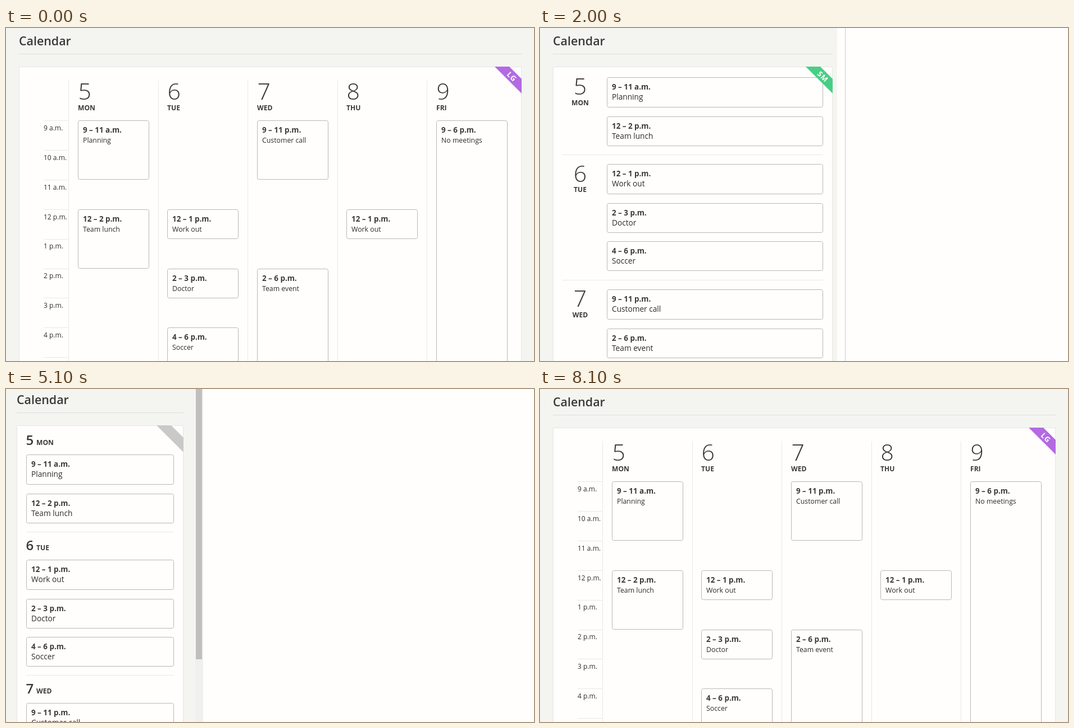
Recreate the animation shown at these times as an HTML page. Size 940x595 px, loop 8400 ms.

```html
<!DOCTYPE html>
<html lang="en">
<head>
<meta charset="utf-8">
<title>Calendar</title>
<style>
html, body { margin: 0; width: 100%; height: 100%; overflow: hidden; background: #fffefd; }
svg { display: block; font-family: "Open Sans", "Noto Sans", sans-serif; fill: #3b3938; }
.title { font-size: 21.4px; font-weight: 600; }
.num { font-size: 41px; font-weight: 300; }
.inline { font-size: 24px; font-weight: 600; }
.day { font-size: 12.1px; font-weight: 700; }
.hour { font-size: 12px; fill: #2e2c2b; }
.time { font-size: 13.4px; font-weight: 700; }
.what { font-size: 13.7px; fill: #2e2c2b; }
.small { font-size: 12.3px; }
.mid { text-anchor: middle; }
.tag { font-size: 13px; font-weight: 700; letter-spacing: 1px; fill: #fff; text-anchor: middle; }
.box { fill: #fffefd; stroke: #b9b8b6; }
.panel { fill: #fffefd; stroke: #e6e6e3; }
</style>
</head>
<body>
<svg id="stage" width="940" height="595" viewBox="0 0 940 595"></svg>
<script>
// [start hour, length, time label, title]
const days = [
  ['MON', [9, 2, '9 – 11 a.m.', 'Planning'], [12, 2, '12 – 2 p.m.', 'Team lunch']],
  ['TUE', [12, 1, '12 – 1 p.m.', 'Work out'], [14, 1, '2 – 3 p.m.', 'Doctor'], [16, 2, '4 – 6 p.m.', 'Soccer']],
  ['WED', [9, 2, '9 – 11 p.m.', 'Customer call'], [14, 4, '2 – 6 p.m.', 'Team event']],
  ['THU', [12, 1, '12 – 1 p.m.', 'Work out']],
  ['FRI', [9, 9, '9 – 6 p.m.', 'No meetings']]
];
// [minimum panel width, label, ribbon colour]
const sizes = [[768, 'LG', '#b36ae2'], [576, 'MD', '#3fbac4'], [384, 'SM', '#4acd86'], [0, '', '#c9c9c8']];
// [step, right edge of the pane, layout width]
const drag = [
  [2, 947, 941], [6, 897, 884], [11, 773, 760], [13, 720, 710], [15, 674, 664],
  [20, 544, 544], [24, 425, 424], [29, 367, 366], [32, 352, 350], [33, 345, 343]
];
const STEP = 100, LOOP = 8400, FIRST = 2, LAST = 33;

const snap = v => Math.round(v - .5) + .5;
const text = (cls, x, y, s) => `<text class="${cls}" x="${x}" y="${y}">${s}</text>`;
const fill = (x, y, w, h, color) => `<rect x="${x}" y="${y}" width="${w}" height="${h}" fill="${color}"/>`;
const hline = (x1, x2, y, color = '#e8e8e6') => fill(x1, Math.round(y - .5), x2 - x1, 1, color);

function eventBox(x, y, w, h, [, , time, what], small = '') {
  y = snap(y);
  return `<rect class="box" x="${x}" y="${y}" width="${w}" height="${h}" rx="3"/>` +
    text('time', x + 8.5, y + 21.5, time) + text('what ' + small, x + 8.5, y + 39.5, what);
}

function weekGrid(right) {
  const w = right - 23, col = w * .1782, left = 23 + w * .099, hour = 52.9;
  let out = '';
  for (let h = 9; h < 18; h++) {
    const y = 165.5 + (h - 9) * hour;
    out += hline(left - 44.6, left, y) +
      text('hour', left - 44.6, y + 17.3, `${(h + 11) % 12 + 1} ${h < 12 ? 'a' : 'p'}.m.`);
  }
  days.forEach(([name, ...events], i) => {
    const x = left + i * col, bx = snap(x + 16.9);
    out += fill(Math.round(x - .5), 93, 1, 502, '#e8e8e6') +
      text('num', bx, 128, 5 + i) + text('day', bx - .5, 147, name);
    for (const e of events)
      out += eventBox(bx, 165.5 + (e[0] - 9) * hour, Math.round(col - 33), Math.round(e[1] * hour - .8), e, 'small');
  });
  return out;
}

function dayList(pad, right, stacked) {
  const x = stacked ? pad + 17.5 : 119.5, w = right - 17.5 - x;
  let y = pad + 48.4, out = '';
  days.forEach(([name, ...events], i) => {
    if (i) out += hline(pad + 17, right - 17, y);
    if (stacked) {
      const base = Math.round(y + 32.5);
      out += text('inline', pad + 16.5, base, 5 + i) + text('day', pad + 35, base, name);
      y += 49.8;
    } else {
      y += 17.05;
      out += text('num mid', 71.5, y + 31, 5 + i) + text('day mid', 71.5, y + 49.5, name);
    }
    // the first box of a day is slightly taller
    events.forEach((e, n) => {
      out += eventBox(x, y, w, n ? 52 : 53, e);
      y += n ? 68.2 : 70;
    });
  });
  return out;
}

function ribbon(r, top, label, color) {
  const x = r - 17.5, y = top + 17.5;
  return `<path fill="${color}" d="M${r - 48} ${top}h26L${r} ${top + 22}v26z"/>` +
    `<g transform="translate(${x} ${y}) rotate(45)">${text('tag', .5, 5, label)}</g>`;
}

function paneAt(k) {
  const i = Math.max(1, drag.findIndex(d => d[0] >= k));
  const a = drag[i - 1], b = drag[i], f = (k - a[0]) / (b[0] - a[0]);
  return [1, 2].map(n => Math.round(a[n] + (b[n] - a[n]) * f));
}

function draw(k) {
  const [edge, width] = paneAt(k);
  const [min, label, color] = sizes.find(s => width - 46 >= s[0]);
  const stacked = !min, wide = min > 384;
  const pad = width < 400 ? 19 : 23, top = pad + 46;
  const right = width - pad - (stacked ? 15 : 0);
  const paper = edge - (wide ? 7 : 15);
  let out = fill(0, 0, paper, 595, '#f4f5f1');
  if (wide) out += fill(paper, 0, 2, 595, '#b9b9b9');
  if (stacked) out += fill(paper, 0, 14, 595, '#f0f0ef') + fill(paper + 1, 0, 11, 483, '#c0bfbe');
  if (!stacked || k === LAST) out += fill(edge - 1, 0, 1, 595, '#cccbca');
  out += text('title', pad, pad + 8, 'Calendar') + hline(pad, right, pad + 23, '#deded9') +
    `<rect class="panel" x="${pad + .5}" y="${top + .5}" width="${right - pad - 1}" height="900"/>` +
    (label === 'LG' ? weekGrid(right) : dayList(pad, right, stacked)) +
    ribbon(right, top, label, color);
  stage.innerHTML = out;
}

const stage = document.getElementById('stage');
let shown;
function tick() {
  const n = Math.floor(performance.now() % LOOP / STEP);
  const k = Math.max(FIRST, Math.min(n, 83 - n, LAST));
  if (k !== shown) draw(shown = k);
  requestAnimationFrame(tick);
}
tick();
</script>
</body>
</html>
```
